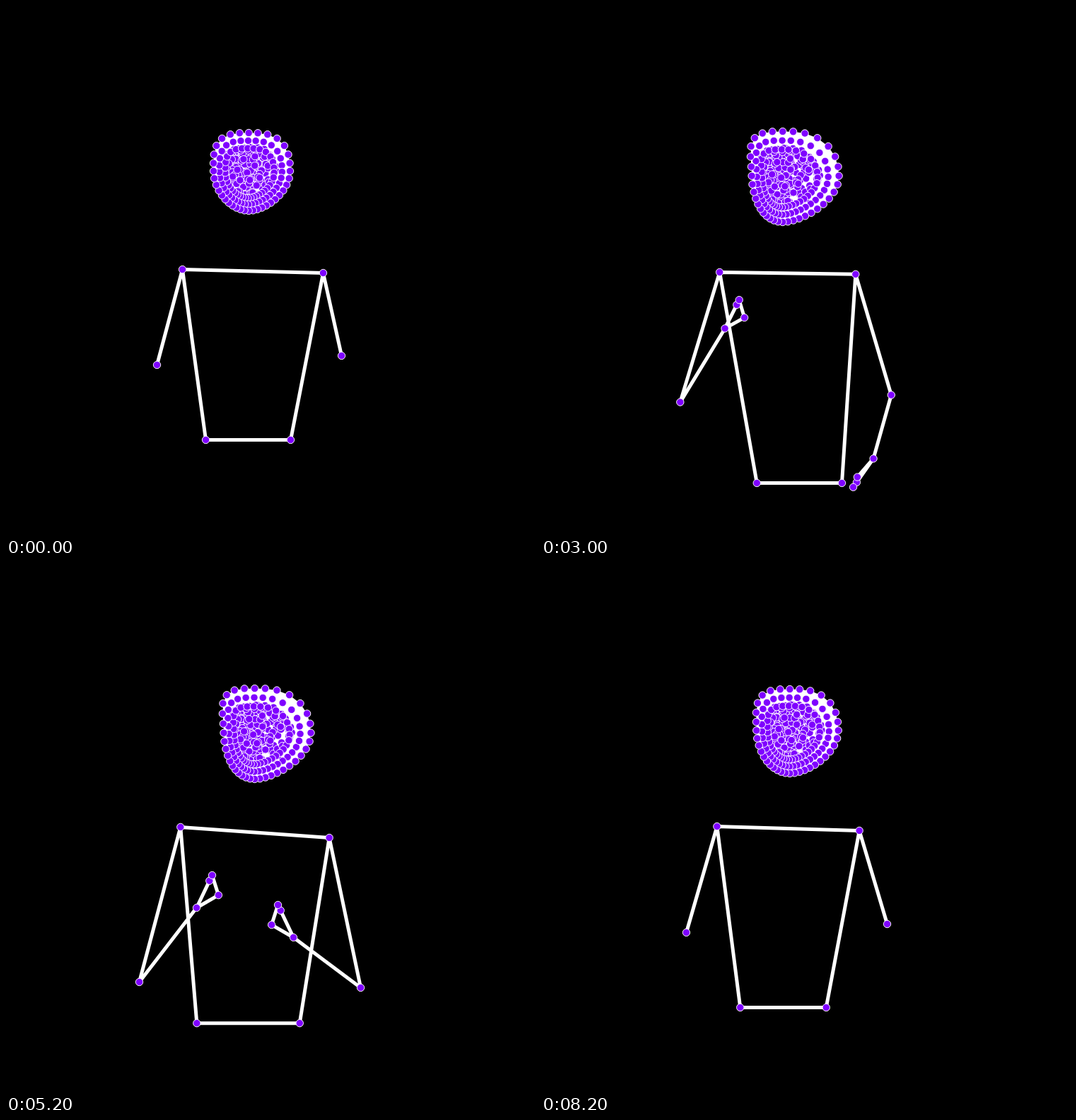
An HTML page with a canvas for the animation above (8.4 s loop, 748x748 px).

```html
<!DOCTYPE html>
<html lang="en">
<head>
<meta charset="utf-8">
<title>Pose tracking</title>
<style>
html, body { margin: 0; height: 100%; background: #000; overflow: hidden; }
canvas { display: block; }
</style>
</head>
<body>
<canvas id="stage" width="748" height="748"></canvas>
<script>
const g = document.getElementById('stage').getContext('2d');
const LOOP = 8400, STEP = 200, TAU = 2 * Math.PI, PURPLE = '#7f00ff';
g.lineJoin = 'round';

const mix = (a, b, k) => a + (b - a) * k;
const ramp = (t, from, to) => Math.min(1, Math.max(0, (t - from) / (to - from)));
const ease = (t, from, to) => { const k = ramp(t, from, to); return k * k * (3 - 2 * k); };
const bump = (t, peak, width) => Math.exp(-(((t - peak) / width) ** 2));

let seed = 7;
const random = () => (seed = seed * 16807 % 2147483647) / 2147483647;
const scatter = Array.from({ length: 260 }, () => [random() * TAU, .68 * Math.sqrt(random())]);

// Time, wrist, then the index finger tip relative to it.
const leftHand = [
  [1800, 222, 620, 16, 5], [2400, 245, 500, 18, -21], [3800, 279, 396, 23, -66],
  [5200, 269, 487, 22, -46], [6600, 263, 527, 24, -54], [7600, 205, 680, 12, 55]
];
const rightHand = [
  [1800, 480, 660, -22, 52], [2400, 479, 663, -26, 46], [3800, 457, 608, -32, 33],
  [5200, 406, 529, -22, -46], [6600, 415, 540, -35, -50], [7600, 478, 665, -16, 53]
];

// Wrist, thumb, index and little finger; side is 1 for the left hand, -1 for the right.
function handAt(keys, t, side) {
  const next = keys.findIndex(key => key[0] >= t);
  if (next < 1) return null;
  const a = keys[next - 1], b = keys[next], k = ramp(t, a[0], b[0]);
  const [, x, y, dx, dy] = a.map((v, i) => mix(v, b[i], k));
  const finger = (size, turn) => {
    const c = size * Math.cos(turn), s = size * Math.sin(turn) * side;
    return [x + dx * c - dy * s, y + dx * s + dy * c];
  };
  return [[x, y], finger(.83, 0), finger(1, 0), finger(.7, dy < 0 ? .6 : -.1)];
}

function bodyAt(t) {
  const s = Math.sin(t / LOOP * TAU), c = Math.cos(t / LOOP * TAU);
  const lean = bump(t, 3800, 950), drop = ramp(t, 6600, 8200);
  const hipX = 342 + 25 * bump(t, 2700, 1000), hipHalf = 60 + 17 * bump(t, 5900, 1300);
  const hipY = 613 + 30 * ramp(t, 500, 2600) + 63 * lean - 15 * drop;
  return {
    torso: [
      [249 + 4 * s, 372 + 8 * lean],
      [448 - 11 * s + 10 * lean, 381 - 6 * s - 4 * c],
      [hipX + hipHalf, hipY],
      [hipX - hipHalf, hipY]
    ],
    leftElbow: [
      213 - 25 * ramp(t, 1800, 3600) + 17 * drop,
      507 + 85 * ramp(t, 400, 4600) - 70 * drop
    ],
    rightElbow: [
      474 + 27 * ramp(t, 1000, 3600) + 36 * bump(t, 4400, 300) - 12 * drop,
      494 + 106 * ramp(t, 800, 5000) - 90 * drop
    ]
  };
}

function lines(color, paths) {
  g.lineWidth = 5;
  g.strokeStyle = color;
  g.beginPath();
  for (const path of paths) path.forEach((p, i) => i ? g.lineTo(...p) : g.moveTo(...p));
  g.stroke();
}

function dots(color, points) {
  g.fillStyle = color;
  g.strokeStyle = '#fff';
  g.lineWidth = 1;
  for (const [x, y] of points) {
    g.beginPath();
    g.arc(x, y, 5.2, 0, TAU);
    g.fill();
    g.stroke();
  }
}

function drawFingers([x, y]) {
  const wrist = [x - 12, y + 2];
  const chain = (rootX, rootY, stepX, stepY, reach) =>
    reach.map(k => [wrist[0] + rootX + stepX * k, wrist[1] + rootY + stepY * k]);
  const chains = [chain(-9, -31, 4, -23, [0, 1, 2, 3])];
  for (let i = 0; i < 4; i++) {
    const size = 1 - .1 * i;
    chains.push(chain(15 + 12 * i, -73 + 12.5 * i, 30 * size, -26 * size, [0, 1, 1.4, 1.8]));
  }
  const roots = chains.map(c => c[0]);
  lines('#3c8c00', [...chains, [roots[0], wrist, ...roots.slice(1), wrist]]);
  dots('#0f0', [wrist, ...chains.flat()]);
}

function drawBody(t, left, right) {
  const { torso, leftElbow, rightElbow } = bodyAt(t);
  const paths = [[...torso, torso[0]]], joints = [...torso];
  const arm = (shoulder, elbow, hand) => {
    paths.push([shoulder, elbow]);
    joints.push(elbow);
    if (!hand) return;
    const [wrist, thumb, index, little] = hand;
    paths.push([elbow, wrist, thumb], [wrist, index, little, wrist]);
    joints.push(...hand);
  };
  if (t < 800 || t > 1000) arm(torso[0], leftElbow, left);
  arm(torso[1], rightElbow, right);
  lines('#fff', paths);
  dots(PURPLE, joints);
}

function drawFace(t) {
  const turn = ease(t, 600, 2400) * (1 - ease(t, 6800, 9600));
  const cx = 347 + 22 * ramp(t, 800, 4800) - 7 * ramp(t, 6600, 8200);
  const cy = 234 + 7 * turn, w = 54 + 7.5 * turn, h = 55 + 9 * turn;
  const bow = mix(.08, .29, turn), midX = mix(-.15, -.35, turn), midY = .1;

  // An egg: squarer above, rounder below, both ends bowed to the left.
  const point = (a, s) => {
    const c = Math.cos(a), d = Math.sin(a), n = d < 0 ? 3 : 1.8;
    const r = (Math.abs(c) ** n + Math.abs(d) ** n) ** (-1 / n);
    const x = r * c - bow * (r * d) ** 2, y = r * d;
    return [cx + w * mix(midX, x, s), cy + h * mix(midY, y, s)];
  };
  const ring = s => Array.from({ length: 36 }, (_, i) => {
    const a = i / 36 * TAU;
    return point(a + .35 * Math.cos(a), s);
  });

  const edge = ring(1);
  g.fillStyle = '#fff';
  g.beginPath();
  edge.forEach(p => g.lineTo(...p));
  g.fill();
  dots(PURPLE, [...scatter.map(p => point(...p)), ...ring(.64), ...ring(.82), ...edge]);
}

function draw(now) {
  const t = Math.floor(now % LOOP / STEP) * STEP;
  const left = handAt(leftHand, t, 1), right = handAt(rightHand, t, -1);
  g.setTransform(1, 0, 0, 1, 0, 0);
  g.fillStyle = '#000';
  g.fillRect(0, 0, 748, 748);
  g.translate(.5, .5);
  if (t >= 3600 && t <= 4000) drawFingers(left[0]);
  drawBody(t, left, right);
  drawFace(t);
}

const start = performance.now();
function tick() {
  draw(performance.now() - start);
  requestAnimationFrame(tick);
}
tick();
</script>
</body>
</html>
```
